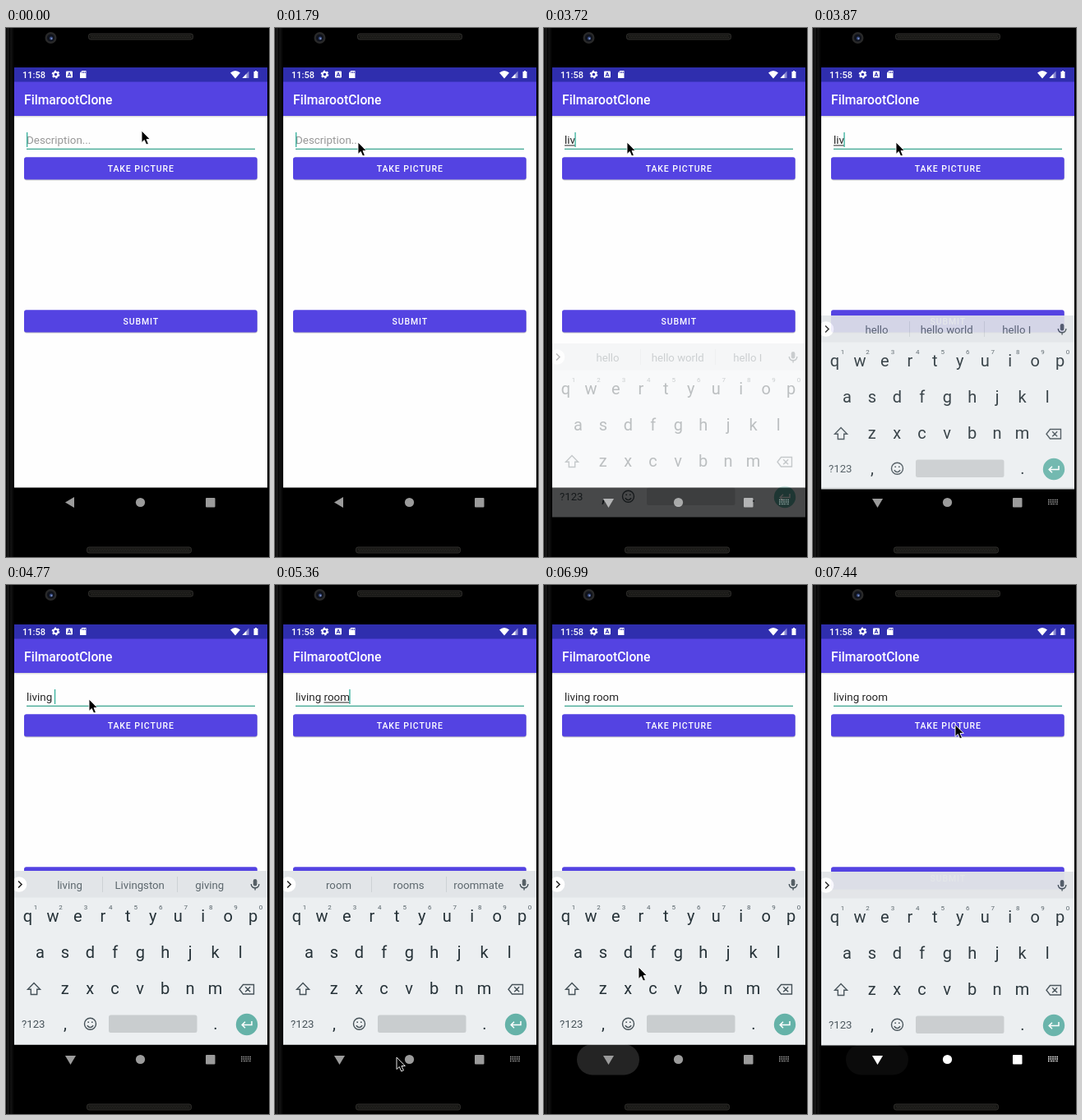
Animation, 320 px wide and 644 px high, one loop 8 s. Source, as an HTML page:

```html
<!DOCTYPE html>
<html lang="en">
<head>
<meta charset="utf-8">
<title>Picture form</title>
<style>
html, body { margin: 0; width: 100%; height: 100%; overflow: hidden; background: #000; }
svg { display: block; width: 320px; height: 644px; }
text { font-family: Roboto, sans-serif; white-space: pre; }
.mid { text-anchor: middle; }
.label { font-size: 10.5px; font-weight: 500; letter-spacing: .93px; fill: #fff; }
.field { font-size: 13.4px; }
.key { font-size: 20px; fill: #263238; }
.hint { font-size: 8px; fill: #546067; }
.small { font-size: 13.2px; fill: #455158; }
.word { font-size: 13.2px; fill: #5c676d; }
.icon { fill: none; stroke: #455158; stroke-width: 1.4; }
</style>
</head>
<body>
<svg viewBox="0 0 320 644">
  <defs>
    <linearGradient id="edge">
      <stop offset="0" stop-color="#050505"/><stop offset=".25" stop-color="#1c1c1c"/>
      <stop offset=".45" stop-color="#060606"/><stop offset=".6" stop-color="#141414"/>
      <stop offset="1" stop-color="#000"/>
    </linearGradient>
    <clipPath id="screen"><path d="M10 48H318V597H10Z"/></clipPath>
    <clipPath id="nav"><path d="M10 559H318V597H10Z"/></clipPath>
    <g id="speaker">
      <rect x=".5" y=".5" width="127" height="7" rx="2.5" fill="#161614" stroke="#302f2c"/>
      <path d="M3 3H125M4 5H125" stroke="#33312d" stroke-dasharray="1 1"/>
    </g>
  </defs>

  <!-- phone body -->
  <path d="M0 0H320V644H0Z"/>
  <path d="M0 0H10V644H0Z" fill="url(#edge)"/>
  <circle cx="54.5" cy="12" r="7" fill="#292929"/>
  <circle cx="54.5" cy="12" r="4.6" fill="#10131c"/>
  <circle cx="55" cy="12.5" r="2" fill="#3a4f86"/>
  <circle cx="55.5" cy="13" r=".8" fill="#a9bbe8"/>
  <use href="#speaker" x="100" y="6.5"/>
  <use href="#speaker" x="98" y="631.5"/>

  <!-- app -->
  <path d="M10 48H318V559.5H10Z" fill="#fefefe"/>
  <path d="M10 107H318V108.5H10Z" opacity=".13"/>
  <path d="M10 48H318V66H10Z" fill="#2f2eae"/>
  <path d="M10 65.5H318V107H10Z" fill="#5443e2"/>
  <text x="20" y="61" font-size="11" font-weight="500" fill="#fff">11:58</text>
  <g fill="#fff">
    <circle cx="60.5" cy="56.5" r="2.8" fill="none" stroke="#fff" stroke-width="2"/>
    <circle cx="60.5" cy="56.5" r="4.2" fill="none" stroke="#fff" stroke-width="1.4" stroke-dasharray="2.2"/>
    <rect x="73" y="52.5" width="8" height="8" rx="1"/>
    <path d="M75 59L77 54L79 59M75.8 57.5H78.2" fill="none" stroke="#2f2eae"/>
    <path d="M92.5 52H97.5V61H90V54.5Z"/>
    <path d="M92.8 53V55M94.6 53V55M96.3 53V55" stroke="#2f2eae" stroke-width=".8"/>
    <path d="M273 54.5Q279 49.5 285 54.5L279 61.5Z"/>
    <path d="M287.5 61H295.5V52.5Z" opacity=".45"/>
    <path d="M287.5 61H292.5V55.7Z"/>
    <path d="M301.5 53H303V52H305V53H306.5V61H301.5Z"/>
  </g>
  <text x="22" y="92.5" font-size="15.7" font-weight="500" fill="#fff">FilmarootClone</text>
  <text id="hint" class="field" x="25" y="141" fill="#979797">Description...</text>
  <text id="value" class="field" x="25" y="141" fill="#252525"></text>
  <path id="compose" stroke="#252525"/>
  <path d="M25 147.3H303" stroke="#3ba58f" stroke-width="1.2"/>
  <rect id="caret" y="127" width="1.3" height="18" fill="#35b09b"/>
  <g id="buttons"></g>

  <!-- navigation bar -->
  <g id="bar">
    <rect id="ripple" y="559" height="37.5" rx="18.7" fill="#fff" clip-path="url(#nav)"/>
    <g fill="currentColor">
      <path id="back"/>
      <circle cx="163.5" cy="577.5" r="5.6"/>
      <rect x="243" y="572" width="11.5" height="11.5" rx="1"/>
      <path id="switcher" d="M286 574.5H298M286 577H298M286 579.5H288M289 579.5H295M296 579.5H298"
        stroke="currentColor" stroke-width="1.5" stroke-dasharray="1.6 1"/>
    </g>
  </g>

  <!-- soft keyboard -->
  <g clip-path="url(#screen)">
    <g id="keyboard">
      <path d="M10 348H318V559.5H10Z" fill="#eceff1"/>
      <path d="M10 348H318V380.5H10Z" fill="#e2e5e8"/>
      <circle cx="16" cy="364.5" r="9.3" fill="#fff"/>
      <path d="M15 360.5L19 364.5L15 368.5" fill="none" stroke="#222" stroke-width="1.5"/>
      <g id="words">
        <path d="M117.5 355V374M208.5 355V374" stroke="#cdd2d5"/>
        <text class="word mid" x="77.5" y="369.5"></text>
        <text class="word mid" x="162.7" y="369.5"></text>
        <text class="word mid" x="247.8" y="369.5"></text>
      </g>
      <rect x="300.8" y="358" width="4.6" height="8.5" rx="2.3" fill="#555f65"/>
      <path class="icon" d="M298.3 364Q298.5 368.8 303.1 368.8T307.9 364M303.1 369V371.5"/>
      <g id="keys"></g>
      <path class="icon" d="M34 484.5L41.5 492.2H37.7V498.5H30.3V492.2H26.5Z"/>
      <path class="icon" d="M288.5 486.5H301.5V498H288.5L284 492.2ZM291.2 489.2L297.2 495.3M297.2 489.2L291.2 495.3"/>
      <text class="small" x="19" y="539">?123</text>
      <text class="key mid" x="72" y="540.5">,</text>
      <text class="key mid" x="255" y="540.5">.</text>
      <circle class="icon" cx="102.5" cy="534.3" r="7"/>
      <path class="icon" d="M98.8 536.3Q102.5 541 106.2 536.3M99.4 532.3H101M104 532.3H105.6"/>
      <rect x="125" y="523.5" width="107.5" height="21.5" rx="2.5" fill="#c9cdcf"/>
      <circle cx="293" cy="535" r="13.2" fill="#65b2a8"/>
      <path d="M299 531V535.5H287.5M291 531.7L287.2 535.5L291 539.3" fill="none" stroke="#fff" stroke-width="1.5"/>
    </g>
  </g>

  <path id="pointer" d="M0 0V14.5L3.3 11.5L5.7 17L8.4 15.9L6 10.5H10.3Z" stroke="#fff" stroke-width=".9"/>
</svg>
<script>
const $ = id => document.getElementById(id);
const pen = document.createElement('canvas').getContext('2d');
const widthOf = s => { pen.font = '13.4px Roboto, sans-serif'; return pen.measureText(s).width; };
const setAll = (el, attrs) => { for (const k in attrs) el.setAttribute(k, attrs[k]); };

const button = (y, label) => `
  <rect x="22" y="${y + 1}" width="284" height="27.3" rx="3" opacity=".22"/>
  <rect x="22" y="${y}" width="283.7" height="27.2" rx="2.7" fill="#5443e2"/>
  <text class="label mid" x="164.3" y="${y + 17.6}">${label}</text>`;
$('buttons').innerHTML = button(157.3, 'TAKE PICTURE') + button(343.3, 'SUBMIT');

const row = (chars, x, y, cls) => [...chars].map((c, i) =>
  `<text class="${cls} mid" x="${x + i * 30.45}" y="${y}">${c}</text>`).join('');
$('keys').innerHTML = row('qwertyuiop', 26.5, 409.5, 'key') + row('1234567890', 36, 394.5, 'hint') +
  row('asdfghjkl', 41.5, 453.5, 'key') + row('zxcvbnm', 71.7, 497.7, 'key');

// Each step: start time in ms and what changes then.
const steps = [
  [0, { text: '', compose: 0, caret: 1, at: [165, 125], typing: 0, shift: 0, alpha: 0, words: [], ripple: [22, 0], nav: '#9b9b9b' }],
  [300, { caret: 0 }],
  [890, { caret: 1 }],
  [1340, { caret: 0, at: [162, 116] }],
  [1490, { at: [135, 126] }],
  [1640, { at: [107, 138] }],
  [1790, { caret: 1, at: [101, 139] }],
  [2390, { caret: 0 }],
  [2680, { text: 'l', compose: 1, caret: 1 }],
  [2830, { typing: 1 }],
  [3280, { text: 'li' }],
  [3720, { text: 'liv', shift: 36, alpha: .3, words: ['hello', 'hello world', 'hello I'] }],
  [3870, { shift: 2, alpha: .9 }],
  [4170, { text: 'livi', shift: 0, alpha: 1, words: ['living', 'Livingston', 'giving'] }],
  [4320, { text: 'living' }],
  [4770, { text: 'living ', compose: 0 }],
  [4910, { text: 'living r', compose: 1, words: ['room', 'rooms', 'roommate'] }],
  [5060, { text: 'living ro' }],
  [5210, { text: 'living roo', at: [122, 330] }],
  [5360, { text: 'living room', at: [148, 575] }],
  [5960, { caret: 0, at: [112, 579] }],
  [6110, { at: [82, 574] }],
  [6410, { caret: 1, compose: 0, words: [], ripple: [22.5, .17] }],
  [6560, { ripple: [31, .18] }],
  [6710, { ripple: [36, .16], at: [90, 556] }],
  [6850, { ripple: [38, .14], caret: 0, at: [115, 465] }],
  [7000, { ripple: [38, .11], at: [146, 325] }],
  [7150, { ripple: [38, .08], at: [168, 208] }],
  [7300, { ripple: [38, .06], at: [173, 173] }],
  [7440, { ripple: [38, .045], at: [173, 170], shift: 1, alpha: .96, nav: '#fff' }]
];

function draw(s) {
  const end = 25 + widthOf(s.text);
  const start = 25 + widthOf(s.text.slice(0, s.text.lastIndexOf(' ') + 1));
  $('value').textContent = s.text;
  setAll($('hint'), { opacity: s.text ? 0 : 1 });
  setAll($('compose'), { d: `M${start} 143H${end}`, opacity: s.compose });
  setAll($('caret'), { x: end - (s.text ? .6 : 0), opacity: s.caret });
  setAll($('keyboard'), { transform: `translate(0 ${s.shift})`, opacity: s.alpha });
  setAll($('words'), { opacity: s.words.length ? 1 : 0 });
  $('words').querySelectorAll('text').forEach((el, i) => el.textContent = s.words[i] || '');
  const [w, a] = s.ripple;
  setAll($('ripple'), { x: 78 - w, width: 2 * w, opacity: a });
  setAll($('back'), { d: s.typing ? 'M72 573H85L78.5 584Z' : 'M72 577.5L83 571V584Z' });
  setAll($('switcher'), { opacity: s.typing });
  $('bar').style.color = s.nav;
  setAll($('pointer'), { transform: `translate(${s.at})` });
}

const begin = performance.now();
function tick() {
  const t = Math.max(0, performance.now() - begin) % 8000;
  draw(Object.assign({}, ...steps.filter(([at]) => at <= t).map(([, change]) => change)));
  requestAnimationFrame(tick);
}
tick();
</script>
</body>
</html>
```
